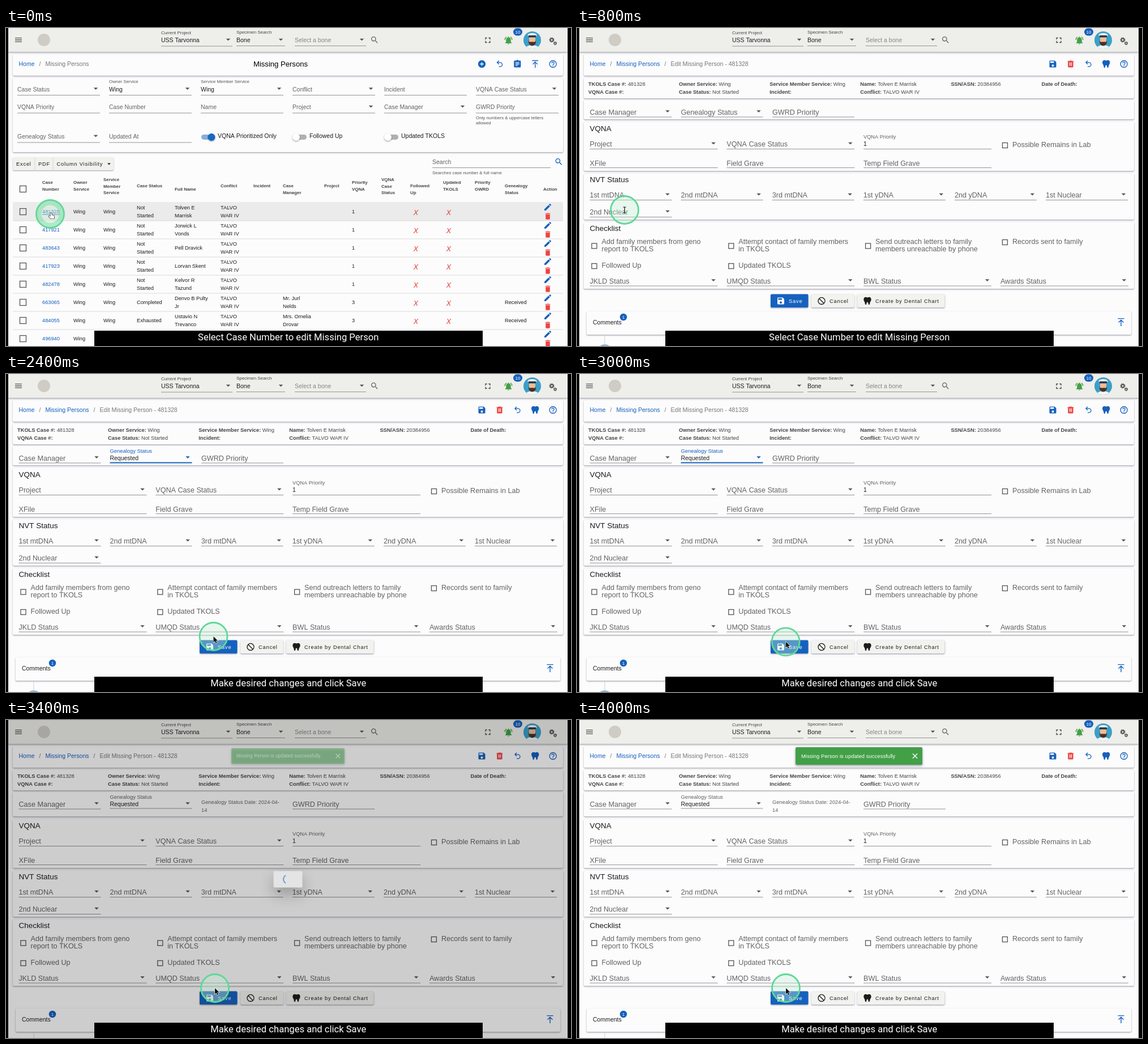
An HTML page with a canvas for the animation above (4400 ms loop, 998x561 px).

```html
<!DOCTYPE html>
<html lang="en">
<head>
<meta charset="utf-8">
<title>Edit a missing person case</title>
<style>
html, body { margin: 0; width: 100%; height: 100%; overflow: hidden; background: #000; }
canvas { display: block; }
</style>
</head>
<body>
<canvas id="stage" width="998" height="561"></canvas>
<script>
const ctx = document.getElementById('stage').getContext('2d');
const LOOP = 4400, STEP = 200, LAST = 20;
const SANS = '"Liberation Sans", Arial, sans-serif';
const BLUE = '#1560bd', INK = '#1c1c1c', SOFT = '#636363', RED = '#ee4444', PAGE = '#fcfcfd';

const icons = {
  menu: 'M3 18h18v-2H3zM3 13h18v-2H3zM3 6v2h18V6z',
  drop: 'M6 9l6 6 6-6z',
  search: 'M15.5 14h-.79l-.28-.27A6.47 6.47 0 0 0 16 9.5 6.5 6.5 0 1 0 9.5 16c1.61 0 3.09-.59 4.23-1.57l.27.28v.79l5 4.99L20.49 19zm-6 0C7 14 5 12 5 9.5S7 5 9.5 5 14 7 14 9.5 12 14 9.5 14z',
  full: 'M7 14H5v5h5v-2H7zM5 10h2V7h3V5H5zM17 17h-3v2h5v-5h-2zM14 5v2h3v3h2V5z',
  bell: 'M12 22a2 2 0 0 0 2-2h-4a2 2 0 0 0 2 2zm6-6v-5c0-3-1.6-5.6-4.5-6.3V4a1.5 1.5 0 0 0-3 0v.7C7.6 5.4 6 7.9 6 11v5l-2 2v1h16v-1zM7.6 4 6.1 2.6A10.5 10.5 0 0 0 2 10.5h2A8.5 8.5 0 0 1 7.6 4zM20 10.5h2a10.5 10.5 0 0 0-4.1-7.9L16.4 4A8.5 8.5 0 0 1 20 10.5z',
  add: 'M12 2a10 10 0 1 0 0 20 10 10 0 0 0 0-20zm5 11h-4v4h-2v-4H7v-2h4V7h2v4h4z',
  undo: 'M13.5 7a6.5 6.5 0 0 1 0 13H10v-2h3.5a4.5 4.5 0 1 0 0-9H7.83l3.08 3.09L9.5 13.5 4 8l5.5-5.5 1.42 1.41L7.83 7z',
  clip: 'M19 3h-4.2a3 3 0 0 0-5.6 0H5a2 2 0 0 0-2 2v14a2 2 0 0 0 2 2h14a2 2 0 0 0 2-2V5a2 2 0 0 0-2-2zM7 7h10v2H7zM7 11h10v2H7zM7 15h6v2H7z',
  top: 'M4 2h16v2H4zM13 9v13h-2V9l-4.5 4.5-1.42-1.42L12 5.16l6.92 6.92-1.42 1.42z',
  help: 'M11 18h2v-2h-2zM12 2a10 10 0 1 0 0 20 10 10 0 0 0 0-20zm0 18a8 8 0 1 1 0-16 8 8 0 0 1 0 16zm0-14a4 4 0 0 0-4 4h2a2 2 0 1 1 4 0c0 2-3 1.75-3 5h2c0-2.25 3-2.5 3-5a4 4 0 0 0-4-4z',
  save: 'M17 3H5a2 2 0 0 0-2 2v14a2 2 0 0 0 2 2h14a2 2 0 0 0 2-2V7zm-5 16a3 3 0 1 1 0-6 3 3 0 0 1 0 6zm3-10H5V5h10z',
  trash: 'M6 19a2 2 0 0 0 2 2h8a2 2 0 0 0 2-2V7H6zM19 4h-3.5l-1-1h-5l-1 1H5v2h14z',
  can: 'M9 3v1H4v2h1v13a2 2 0 0 0 2 2h10a2 2 0 0 0 2-2V6h1V4h-5V3zM9 8h2v9H9zM13 8h2v9h-2z',
  pencil: 'M3 17.25V21h3.75L17.81 9.94l-3.75-3.75zM20.7 7a1 1 0 0 0 0-1.4l-2.3-2.3a1 1 0 0 0-1.4 0l-1.9 1.8 3.8 3.8z',
  tooth: 'M7 2C4 2 2 5 2 8c0 2.1 1 5 2 6 2 2 1 8 3.5 8 3 0 1.5-7 4.5-7s1.5 7 4.5 7C19 22 18 16 20 14c1-1 2-3.9 2-6 0-3-2-6-5-6-2 0-3 1-5 1S9 2 7 2z',
  cancel: 'M12 2a10 10 0 1 0 0 20 10 10 0 0 0 0-20zm0 18a8 8 0 0 1-6.3-12.9l11.2 11.2A8 8 0 0 1 12 20zm6.3-3.1L7.1 5.7a8 8 0 0 1 11.2 11.2z',
  close: 'M19 6.4 17.6 5 12 10.6 6.4 5 5 6.4 10.6 12 5 17.6 6.4 19 12 13.4 17.6 19 19 17.6 13.4 12z',
  arrow: 'M0 0v10.5l2.5-2.3 1.8 4 1.8-.8-1.8-3.9h3.4z',
  hand: 'M-1.5-5a1.1 1.1 0 0 1 2.2 0v3l3.6.8c1 .2 1.3.9 1.2 1.8L5 4.5H-1L-4.5.6c-.7-1 .5-1.8 1.3-1.2l1.7 1.2z'
};
for (const k in icons) icons[k] = new Path2D(icons[k]);

function icon(name, x, y, size = 16, color = BLUE, turn = 0) {
  ctx.save();
  ctx.translate(x, y);
  ctx.rotate(turn);
  ctx.scale(size / 24, size / 24);
  ctx.translate(-12, -12);
  ctx.fillStyle = color;
  ctx.fill(icons[name], 'evenodd');
  ctx.restore();
}

// y is the middle of the capitals
function text(str, x, y, size = 10.5, color = INK, { style = '', align = 'left', gap = 0, family = SANS } = {}) {
  ctx.font = `${style} ${size}px ${family}`;
  ctx.letterSpacing = gap + 'px';
  ctx.textAlign = align;
  ctx.fillStyle = color;
  ctx.fillText(str, x, y + size * 0.36);
}

function lines(str, x, y, lead, ...rest) {
  str.split('|').forEach((s, i) => text(s, x, y + i * lead, ...rest));
}

function rect(x, y, w, h, color) {
  ctx.fillStyle = color;
  ctx.fillRect(x, y, w, h);
}

function disc(x, y, r, color) {
  ctx.fillStyle = color;
  ctx.beginPath();
  ctx.arc(x, y, r, 0, 7);
  ctx.fill();
}

function panel(x, y, w, h, color = PAGE, r = 2, blur = 2.5, shade = 'rgba(45,45,70,.45)') {
  ctx.save();
  ctx.shadowColor = shade;
  ctx.shadowBlur = blur;
  ctx.shadowOffsetY = blur / 2;
  ctx.fillStyle = color;
  ctx.beginPath();
  ctx.roundRect(x, y, w, h, r);
  ctx.fill();
  ctx.restore();
}

const card = (top, bottom) => panel(12, top, 972, bottom - top);

function check(x, y, s) {
  ctx.strokeStyle = '#555';
  ctx.lineWidth = 1.3;
  ctx.strokeRect(x - s / 2, y - s / 2, s, s);
}

function field(label, x, y, w, { drop = true, size = 12.6, color = SOFT, rule = 8.5 } = {}) {
  text(label, x, y, size, color);
  rect(x, y + rule, w, 1, '#949494');
  if (drop) icon('drop', x + w - 7.5, y - 0.8, 15, '#555');
}

function badge(label, x, y, w, r) {
  ctx.fillStyle = BLUE;
  ctx.beginPath();
  ctx.roundRect(x - w / 2, y - r, w, r * 2, r);
  ctx.fill();
  text(label, x, y, 8, '#fff', { align: 'center' });
}

function cog(x, y, r) {
  ctx.strokeStyle = '#555';
  ctx.lineWidth = r * 0.55;
  ctx.beginPath();
  ctx.arc(x, y, r * 0.7, 0, 7);
  ctx.stroke();
  ctx.setLineDash([r * 0.4, r * 0.385]);
  ctx.beginPath();
  ctx.arc(x, y, r, 0, 7);
  ctx.stroke();
  ctx.setLineDash([]);
}

function avatar(x, y) {
  ctx.save();
  ctx.beginPath();
  ctx.arc(x, y, 15.5, 0, 7);
  ctx.clip();
  rect(x - 16, y - 16, 32, 32, '#3b9fc9');
  ctx.fillStyle = '#f2f4f5';
  ctx.beginPath();
  ctx.ellipse(x, y + 15.5, 12, 7, 0, 0, 7);
  ctx.fill();
  disc(x, y + 3.5, 6.5, '#4a3029');
  rect(x - 5.5, y - 6, 11, 9, '#f0bd92');
  ctx.fillStyle = '#f4f4f4';
  ctx.beginPath();
  ctx.ellipse(x, y - 9, 8, 3.5, 0, 0, 7);
  ctx.fill();
  rect(x - 6.5, y - 8.5, 13, 3.5, '#23384d');
  ctx.restore();
}

function topBar() {
  panel(4, -4, 988, 46, '#eeeeea', 0, 3);
  icon('menu', 22, 21, 16, '#555');
  disc(67, 21, 11, '#cfccc5');
  text('Current Project', 274, 8, 7.9, '#444');
  field('USS Tarvonna', 274, 21.5, 126, { size: 10.5, color: INK, rule: 10 });
  text('Specimen Search', 407, 7.5, 7.9, '#444');
  field('Bone', 407, 21.5, 86, { size: 10.5, color: INK, rule: 9.5 });
  field('Select a bone', 510, 21.5, 126, { size: 10.5, color: '#858585', rule: 9.5 });
  icon('search', 651, 21, 16, '#666');
  icon('full', 851, 21.5, 16, '#444');
  icon('bell', 887.5, 22, 17, '#43a047');
  badge('10', 904, 7, 16, 6.5);
  avatar(929.5, 21.5);
  cog(964, 21, 3.6);
  cog(970, 27, 2.5);
}

function crumbs(...parts) {
  card(46, 84);
  let x = 22.5;
  parts.forEach((p, i) => {
    text(p, x, 63.5, 10.5, i < parts.length - 1 ? BLUE : '#777');
    x += ctx.measureText(p).width + 8;
    if (i < parts.length - 1) text('/', x, 63.5, 10.5, '#777');
    x += 11;
  });
}

const toolIcons = names => names.forEach((n, i) => icon(n, 840.5 + i * 31.4, 63.5, 16, n === 'can' ? RED : BLUE));

function toggle(label, x, on) {
  ctx.fillStyle = on ? '#86aedb' : '#b0b0b0';
  ctx.beginPath();
  ctx.roundRect(x, 188, 24, 9, 4.5);
  ctx.fill();
  panel(on ? x + 11.5 : x - 1, 186, 13, 13, on ? '#1867c0' : '#fff', 6.5);
  text(label, x + 29, 190.5);
}

const heads = [
  [64, 272, 'Case|Number'], [119, 272, 'Owner|Service'], [172, 267, 'Service|Member|Service'],
  [231, 278.5, 'Case Status'], [298, 284, 'Full Name'], [379, 278.5, 'Conflict'], [437, 278.5, 'Incident'],
  [489, 278.5, 'Case|Manager'], [562, 278.5, 'Project'], [611, 272, 'Priority|VQNA'],
  [663, 267, 'VQNA|Case|Status'], [714, 278.5, 'Followed|Up'], [772, 272, 'Updated|TKOLS'],
  [828, 272, 'Priority|GWRD'], [881, 278.5, 'Genealogy|Status'], [949, 284, 'Action']
];
const cases = [
  ['481328', 'Tolven E|Marrisk'], ['417921', 'Jorwick L|Vonds'], ['483643', 'Pell Dravick'],
  ['417923', 'Lorvan Skent'], ['482478', 'Kelvor R|Tazund'],
  ['663065', 'Denvo B Pulty|Jr', 'Completed', 'Mr. Jurl|Nelds'],
  ['484055', 'Ustavio N|Trevanco', 'Exhausted', 'Mrs. Omelia|Drovar'], ['496940', '']
];

function tableRow([id, name, status, manager = ''], i) {
  const y = 324 + i * 32, size = 9.25;
  const cell = (s, x) => lines(s, x, y - (s.includes('|') ? 7 : 0), 13.5, size);
  if (!i) rect(12, 308, 972, 32, '#ebebeb');
  rect(12, y + 15.5, 972, 1, '#dcdcdc');
  check(30, y, 11);
  text(id, 64, y, size, BLUE);
  if (!i) rect(64, y + 4.5, 31, 1, BLUE);
  cell('Wing', 119);
  cell('Wing', 172);
  cell(status || 'Not|Started', 231);
  cell(name, 298);
  cell('TALVO|WAR IV', 379);
  cell(manager, 489);
  cell(status ? '3' : '1', 611);
  if (status) cell('Received', 881);
  for (const x of [724, 782]) text('X', x, y + 1, 12.5, '#e53935', { style: 'italic', align: 'center' });
  icon('pencil', 957, y - 8, 16);
  icon('trash', 957, y + 8, 15, RED);
}

function listPage() {
  crumbs('Home', 'Missing Persons');
  text('Missing Persons', 485, 63.5, 13.1, '#000', { align: 'center' });
  toolIcons(['add', 'undo', 'clip', 'top', 'help']);
  card(88, 219);
  const row = (y, rule, labels, drops) => labels.forEach((s, i) =>
    field(s, 20 + i * 162, y, 146, { size: 10.5, drop: drops.includes(i), color: s === 'Wing' ? INK : SOFT, rule }));
  row(108, 10, ['Case Status', 'Wing', 'Wing', 'Conflict', 'Incident', 'VQNA Case Status'], [0, 1, 2, 3, 5]);
  row(139.5, 10, ['VQNA Priority', 'Case Number', 'Name', 'Project', 'Case Manager', 'GWRD Priority'], [3, 4]);
  row(191.5, 10, ['Genealogy Status', 'Updated At'], [0]);
  text('Owner Service', 182, 94.5, 7.9, '#555');
  text('Service Member Service', 344, 94.5, 7.9, '#555');
  lines('Only numbers & uppercase letters|allowed', 830, 158.5, 8.5, 7.9, '#555');
  toggle('VQNA Prioritized Only', 345, true);
  toggle('Followed Up', 507, false);
  toggle('Updated TKOLS', 669, false);

  panel(12, 228, 178, 23, '#f1f1ed', 2, 2);
  rect(50.5, 228, 1, 23, '#d5d5d2');
  rect(82.5, 228, 1, 23, '#d5d5d2');
  text('Excel', 18, 240, 9.3, INK, { gap: 0.8 });
  text('PDF', 57, 240, 9.3, INK, { gap: 0.8 });
  text('Column Visibility', 89.5, 240, 9.3, INK, { gap: 0.8 });
  icon('drop', 182, 240, 12, INK);
  field('Search', 753, 236.5, 209, { size: 10.5, drop: false, rule: 9.5 });
  text('Searches case number & full name', 753, 255.5, 7.9, '#555');
  icon('search', 976.5, 236, 16);

  check(30, 284, 11);
  heads.forEach(([x, y, s]) => lines(s, x, y, 11.7, 7.9, '#444', { style: 'bold' }));
  rect(12, 307.5, 972, 1, '#dcdcdc');
  cases.forEach(tableRow);
}

function button(x, w, y, name, label, bg, fg) {
  panel(x, y - 12, w, 23.5, bg);
  icon(name, x + 18, y, 16, fg);
  text(label, x + 32, y, 9.3, fg, { gap: 0.8 });
}

function genealogy(n, saved) {
  const x = 183.5, focus = n >= 8 && !saved, open = n >= 8 && n <= 10;
  if (n < 8) return field('Genealogy Status', x, 148, 145);
  text('Genealogy Status', x, 135.5, 9.4, focus ? BLUE : SOFT);
  text(open ? 'Select Genealogy Status' : 'Requested', x, 148.5, 10.45, open ? '#8c8c8c' : INK);
  rect(x, 155.5, 145, focus ? 2 : 1, focus ? '#1867c0' : '#949494');
  if (n === 16) rect(243, 155, 27, 2, '#1a4a9a');
  icon('drop', 321, 147.2, 15, focus ? BLUE : '#555', n === 8 ? -2.3 : open ? Math.PI : 0);
  if (open) rect(183.5, 142, 1, 12, BLUE);
}

function info(key, value, x, y) {
  text(key, x, y, 9.3, '#444', { style: 'bold' });
  const w = ctx.measureText(key).width;
  text(value, x + w + 2.5, y, 9.3, '#444');
}

function editPage(n) {
  const saved = n >= 16;
  crumbs('Home', 'Missing Persons', 'Edit Missing Person - 481328');
  toolIcons(['save', 'can', 'undo', 'tooth', 'help']);
  card(88, 124);
  [['TKOLS Case #:', '481328', 'VQNA Case #:', ''], ['Owner Service:', 'Wing', 'Case Status:', 'Not Started'],
   ['Service Member Service:', 'Wing', 'Incident:', ''], ['Name:', 'Tolven E Marrisk', 'Conflict:', 'TALVO WAR IV'],
   ['SSN/ASN:', '20384956', '', ''], ['Date of Death:', '', '', '']].forEach(([a, b, c, d], i) => {
    info(a, b, 20 + i * 160.1, 98.5);
    info(c, d, 20 + i * 160.1, 112.5);
  });

  card(127, saved ? 170 : 161);
  field('Case Manager', 22.5, 148, 145);
  genealogy(n, saved);
  if (saved) lines('Genealogy Status Date: 2024-04-|14', 345, 144.5, 13.8, 9.26, SOFT);
  field('GWRD Priority', saved ? 506 : 345, 148, 145, { drop: false });

  ctx.save();
  if (saved) ctx.translate(0, 9);
  const wide = i => 22.5 + i * 241.8, narrow = i => 22.5 + i * 161.1;
  card(166, 252);
  text('VQNA', 22.5, 177.5, 13.5);
  field('Project', wide(0), 204.5, 226);
  field('VQNA Case Status', wide(1), 204.5, 226);
  text('VQNA Priority', wide(2), 191.5, 9.2, SOFT);
  field('1', wide(2), 204.5, 226, { drop: false, size: 10.5, color: INK });
  check(756, 207, 9);
  text('Possible Remains in Lab', 769, 205, 12.6, SOFT);
  ['XFile', 'Field Grave', 'Temp Field Grave'].forEach((s, i) => field(s, wide(i), 238.5, 226, { drop: false, rule: 7.5 }));

  card(257, 338);
  text('NVT Status', 22.5, 267.5, 13.5);
  ['1st mtDNA', '2nd mtDNA', '3rd mtDNA', '1st yDNA', '2nd yDNA', '1st Nuclear'].forEach((s, i) => field(s, narrow(i), 294.5, 145));
  field('2nd Nuclear', 22.5, 324.5, 145);

  card(343, 460);
  text('Checklist', 22.5, 353.5, 13.5);
  ['Add family members from geno|report to TKOLS', 'Attempt contact of family members|in TKOLS',
   'Send outreach letters to family|members unreachable by phone', 'Records sent to family'].forEach((s, i) => {
    check(30.5 + i * 241.8, i < 3 ? 384.5 : 378, 9);
    lines(s, 43.5 + i * 241.8, 376, 13, 12.6, SOFT);
  });
  ['Followed Up', 'Updated TKOLS'].forEach((s, i) => {
    check(30.5 + i * 241.8, 420, 9);
    text(s, 43.5 + i * 241.8, 418, 12.6, SOFT);
  });
  ['JKLD Status', 'UMQD Status', 'BWL Status', 'Awards Status'].forEach((s, i) => field(s, wide(i), 446, 226));

  button(342, 66.5, 481.5, 'save', 'Save', '#1562be', '#fff');
  button(414, 76, 481.5, 'cancel', 'Cancel', '#f2f2ef', INK);
  button(495, 154.5, 481.5, 'tooth', 'Create by Dental Chart', '#f2f2ef', INK);

  panel(17, 500, 962, 41);
  text('Comments', 28, 519.5);
  badge('1', 82, 510, 12.5, 6.2);
  icon('top', 961, 519, 17);
  rect(48.5, 542, 1, 19, '#cfcfd6');
  disc(49, 572, 14, '#8fb8d4');
  ctx.restore();

  if (n >= 8 && n <= 10) {
    panel(184, 160, 145, 112, '#fff', 2, 5);
    if (n === 10) rect(184, 162, 145, 26, '#f0f0f0');
    ['Requested', 'Sent', 'Received', 'Not Required'].forEach((s, i) => text(s, 194.5, 175.2 + i * 26, 8.6));
  }
}

function loader(n) {
  const first = n === 16, w = first ? 62 : 51, h = first ? 35 : 29;
  panel(498 - w / 2, 281 - h / 2, w, h, first ? '#c8c8c8' : '#e4e4e4', 2, 24, `rgba(0,0,0,${first ? 0.5 : 0.25})`);
  ctx.strokeStyle = first ? '#2f72c4' : '#6d9dd2';
  ctx.lineWidth = first ? 3 : 2;
  ctx.beginPath();
  ctx.arc(498, 281, 8, first ? 0.5 : 2.1, first ? 0.95 : 4.2);
  ctx.stroke();
}

function toast(scale, alpha) {
  ctx.save();
  ctx.globalAlpha = alpha;
  ctx.translate(498, 63.5);
  ctx.scale(scale, scale);
  panel(-112, -15.5, 224, 31, '#43a047', 2, 4);
  text('Missing Person is updated successfully', -102, 0, 9.3, '#fff', { gap: 0.12 });
  icon('close', 99, 0, 16, '#fff');
  ctx.restore();
}

const stops = [[0, 78, 328], [3, 79, 328], [4, 84, 321], [5, 95, 301], [7, 290, 152], [8, 292, 152],
  [10, 222, 175], [12, 366.5, 463], [13, 368, 471], [16, 369, 473], [LAST + 1, 369, 473]];

function place(n) {
  const i = stops.findIndex(s => s[0] > n);
  const [a, x, y] = stops[i - 1], [b, u, v] = stops[i];
  const k = (n - a) / (b - a);
  return [x + (u - x) * k, y + (v - y) * k];
}

function shape(name, x, y, fill, edge) {
  ctx.save();
  ctx.translate(x, y);
  ctx.lineWidth = 1.2;
  ctx.strokeStyle = edge;
  ctx.stroke(icons[name]);
  ctx.fillStyle = fill;
  ctx.fill(icons[name]);
  ctx.restore();
}

function pointer(n) {
  const [x, y] = place(n), click = n === 0 || n === 8;
  disc(x, y, 25, 'rgba(195,236,210,.38)');
  ctx.lineWidth = 2.8;
  ctx.strokeStyle = '#5fd898';
  ctx.beginPath();
  ctx.arc(x, y, 24.5, 0, 7);
  ctx.stroke();
  if (click) {
    ctx.lineWidth = 8;
    ctx.strokeStyle = 'rgba(110,218,155,.45)';
    ctx.beginPath();
    ctx.arc(x, y, 19.5, 0, 7);
    ctx.stroke();
  }
  if (n < 4 || n === 9 || n === 10) shape('hand', x + 2, y + 4, '#fff', '#111');
  else if (n < 9) {
    rect(x - 0.5, y - 5, 1.2, 10, '#111');
    rect(x - 2.5, y - 5.5, 5, 1, '#111');
    rect(x - 2.5, y + 4.5, 5, 1, '#111');
  } else shape('arrow', x, y, '#111', '#fff');
}

function caption(n) {
  rect(156, 534, 686, 27, '#000');
  text(n < 10 ? 'Select Case Number to edit Missing Person' : 'Make desired changes and click Save',
    498.7, 545.2, 16.6, '#fff', { align: 'center', family: 'Roboto, sans-serif' });
}

function draw(n) {
  ctx.save();
  rect(0, 0, 998, 561, '#000');
  ctx.beginPath();
  ctx.rect(4, 0, 988, 561);
  ctx.clip();
  rect(4, 0, 988, 561, PAGE);
  if (n < 4) listPage();
  else editPage(n);
  topBar();
  if (n === 16 || n === 17) {
    rect(4, 0, 988, 561, `rgba(0,0,0,${n === 16 ? 0.38 : 0.19})`);
    loader(n);
  }
  if (n === 17) toast(0.893, 0.48);
  if (n > 17) toast(1, 1);
  pointer(n);
  caption(n);
  ctx.restore();
}

let shown = -1;
const start = performance.now();
function tick() {
  const n = Math.min(LAST, Math.floor((performance.now() - start) % LOOP / STEP));
  if (n !== shown) draw(shown = n);
  requestAnimationFrame(tick);
}
tick();
</script>
</body>
</html>
```
